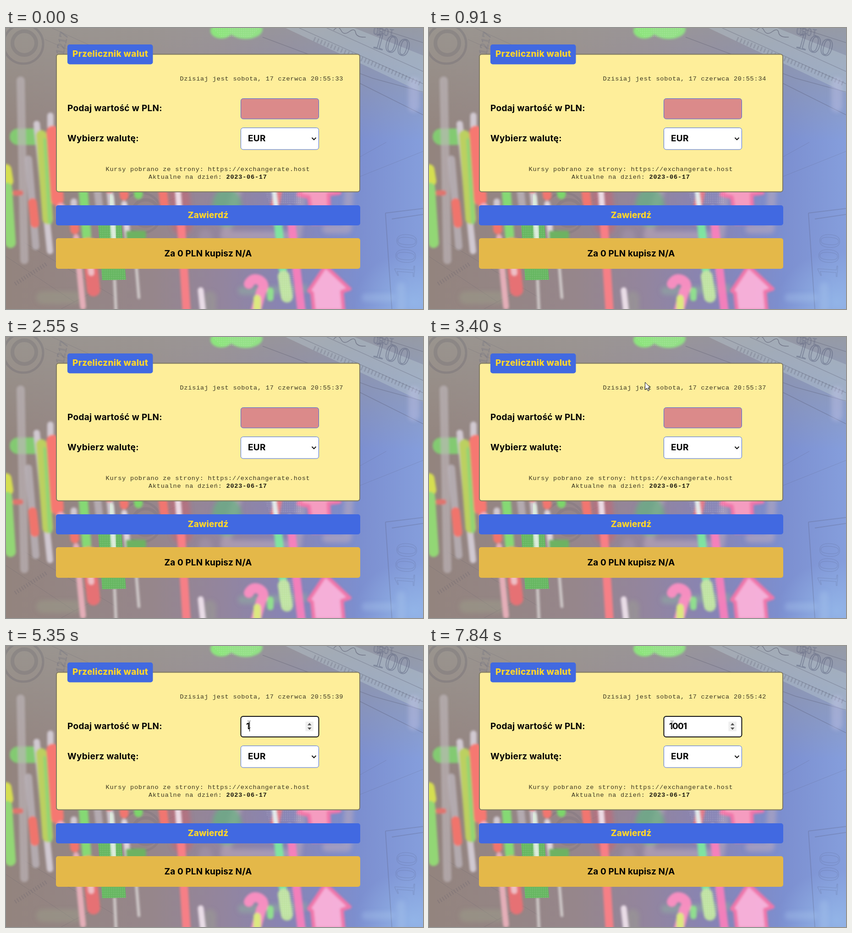
Recreate the animation shown at these times as an HTML page. Size 910x615 px, loop 8000 ms.

```html
<!DOCTYPE html>
<html lang="pl">
<head>
<meta charset="utf-8">
<title>Przelicznik walut</title>
<style>
  html, body { margin: 0; width: 100%; height: 100%; overflow: hidden; background: #9088a0; }
  svg { display: block; width: 100%; height: 100%; }
  text { font: 700 19px Montserrat, Inter, sans-serif; letter-spacing: .3px; white-space: pre; }
  .mid { text-anchor: middle; letter-spacing: .1px; }
  .gold { font-weight: 800; fill: #ffd52b; }
  .title { font-size: 28.8px; letter-spacing: .4px; }
  .mono { font: 400 13.6px "Liberation Mono", monospace; letter-spacing: .762px; fill: #3c3722; }
  .mono tspan { font-weight: 700; fill: #1c1a10; }
  .bill text { font-family: "Liberation Serif", serif; font-weight: 400; letter-spacing: 0; }
  .panel { fill: #feee9a; stroke: #7f7961; stroke-width: 2; }
  .wicks { fill: none; stroke-linecap: round; stroke-linejoin: round; }
  #beam { mix-blend-mode: difference; }
</style>
</head>
<body>
<svg viewBox="0 0 910 615" preserveAspectRatio="none">
  <defs>
    <linearGradient id="sky">
      <stop offset="0" stop-color="#93847e"/>
      <stop offset=".35" stop-color="#96868b"/>
      <stop offset=".52" stop-color="#93859e"/>
      <stop offset=".68" stop-color="#8784b5"/>
      <stop offset=".85" stop-color="#7c8fd0"/>
      <stop offset="1" stop-color="#859edc"/>
    </linearGradient>
    <linearGradient id="haze" x2="0" y2="1">
      <stop offset="0" stop-color="#9c9a94" stop-opacity=".75"/>
      <stop offset=".4" stop-color="#9c9a94" stop-opacity="0"/>
    </linearGradient>
    <radialGradient id="glow">
      <stop offset="0" stop-color="#9cc4f0" stop-opacity=".6"/>
      <stop offset="1" stop-color="#9cc4f0" stop-opacity="0"/>
    </radialGradient>
    <pattern id="dots" width="4" height="4" patternUnits="userSpaceOnUse">
      <circle cx="2" cy="2" r="1.1" fill="#fff" opacity=".2"/>
    </pattern>
    <filter id="soft" x="-5%" y="-5%" width="110%" height="110%"><feGaussianBlur stdDeviation="2.4"/></filter>
    <filter id="mist" x="-10%" y="-10%" width="120%" height="120%"><feGaussianBlur stdDeviation="5"/></filter>
  </defs>

  <rect width="910" height="615" fill="url(#sky)"/>
  <rect width="910" height="615" fill="url(#haze)"/>
  <ellipse cx="890" cy="600" rx="130" ry="110" fill="url(#glow)"/>

  <g class="bill" fill="none" stroke="#4d4d62">
    <path d="M610 0L910 142V60L760 0Z" fill="#b9cbd2" stroke="none" opacity=".4"/>
    <path d="M560 20L800 110L910 140M640 0L910 122M700 0L910 95M770 120L910 190M810 0L910 32" opacity=".28" stroke-width="1.5"/>
    <path d="M672 24L905 122" stroke-width="10" stroke-dasharray="3 5" opacity=".2"/>
    <path d="M715 5q10-12 16 0t18 3 14 2 22 10" opacity=".5" stroke-width="1.5"/>
    <circle cx="38" cy="35" r="43" opacity=".2" stroke-width="5"/>
    <circle cx="40" cy="33" r="26" opacity=".18" stroke-width="8"/>
    <circle cx="295" cy="405" r="44" opacity=".13" stroke-width="5"/>
    <circle cx="305" cy="405" r="29" opacity=".12" stroke-width="7"/>
    <g opacity=".18">
      <path d="M100 0L210 50M85 25L300 120M130 240L330 150M200 225L460 330M345 200L480 300M390 220H510V290H400ZM330 390L460 330M0 500L150 600M40 470L240 590M120 615L205 570M740 300L830 250M760 330L910 270"/>
      <path d="M120 130L260 205M380 240L520 165M20 560L90 515" stroke-width="9" stroke-dasharray="2 4"/>
    </g>
    <path d="M828 405L910 395M828 405L842 615M842 418L910 408" opacity=".2" stroke-width="2"/>
    <g stroke="#555b78" opacity=".42">
      <text transform="translate(798 42) rotate(15)" style="font-size:54px" stroke-width="2">100</text>
      <text transform="translate(848 4) rotate(187)" style="font-size:23px">1080</text>
      <text transform="translate(890 550) rotate(-86)" style="font-size:66px" opacity=".6">100</text>
      <text transform="translate(125 60) rotate(-78)" style="font-size:25px" opacity=".7">1217</text>
      <text transform="translate(258 132) rotate(-62)" style="font-size:18px" opacity=".7">KB</text>
      <text transform="translate(463 134) rotate(-62)" style="font-size:18px" opacity=".7">B</text>
    </g>
  </g>

  <g class="wicks" filter="url(#mist)">
    <path d="M735 240V275" stroke="#66a5ce" stroke-width="64" opacity=".42"/>
    <path d="M890 120V172" stroke="#c5c6e8" stroke-width="24" opacity=".4"/>
    <path d="M376 345L384 430" stroke="#dc5a68" stroke-width="46" opacity=".4"/>
    <path d="M435 455V505" stroke="#a89ab0" stroke-width="28" opacity=".45"/>
    <path d="M510 335L478 455H635L650 325H530M735 325H750L744 440H700" stroke="#c2adbd" stroke-width="20" opacity=".5"/>
    <ellipse cx="482" cy="392" rx="32" ry="44" fill="#62b77e" opacity=".65"/>
    <ellipse cx="517" cy="268" rx="39" ry="42" fill="#5fb58e" opacity=".6"/>
    <path d="M515 575H555M560 575L650 570" stroke="#8fb29f" stroke-width="18" opacity=".5"/>
    <path d="M445 590V615M80 590H150" stroke="#9eab90" stroke-width="28" opacity=".3"/>
    <path d="M785 590H840M862 565V615" stroke="#a9c6ee" stroke-width="18" opacity=".3"/>
  </g>

  <g class="wicks" filter="url(#soft)" opacity=".92">
    <ellipse cx="470" cy="6" rx="24" ry="17" fill="#8cec7c"/>
    <ellipse cx="523" cy="3" rx="37" ry="21" fill="#92e884"/>
    <ellipse cx="505" cy="226" rx="27" ry="23" fill="#f6a276"/>
    <ellipse cx="556" cy="215" rx="32" ry="19" fill="#e8717c"/>
    <ellipse cx="558" cy="130" rx="30" ry="21" fill="#e5737f"/>
    <ellipse cx="500" cy="150" rx="25" ry="22" fill="#df8b78"/>
    <g fill="#ff9fc0" stroke="#fb75a8" stroke-width="8">
      <path d="M660 98L703 136H690V212H638L634 140H615Z" opacity=".85"/>
      <path d="M674 311L728 361L704 364L706 426L669 427L661 370L638 365Z"/>
      <path d="M697 521L750 571L733 577L737 620H672L668 580L661 575Z" fill="#ffb3da"/>
    </g>
    <path d="M560 334H598L580 422" stroke="#eb7581" stroke-width="19"/>
    <path d="M530 560q8-15 23-8q15 9 4 24L545 620" stroke="#ff8fc2" stroke-width="22"/>
    <path d="M548 592V615" stroke="#e3f27b" stroke-width="16"/>
    <path d="M577 575V591" stroke="#91e58d" stroke-width="14"/>
    <path d="M26 238H62" stroke="#82d171" stroke-width="36"/>
    <path d="M0 310L4 335" stroke="#dce64e" stroke-width="24"/>
    <path d="M2 350L10 470" stroke="#93df75" stroke-width="23"/>
    <path d="M32 115L40 508" stroke="#c3bcc1" stroke-width="18" opacity=".65"/>
    <path d="M49 287L65 478M181 190L204 395" stroke="#c2bcc5" stroke-width="16" opacity=".75"/>
    <path d="M67 210L96 488M97 192V215M162 272L166 315M217 254L240 501M148 380V408" stroke="#d6cfd8" stroke-width="14"/>
    <path d="M77 235L91 418" stroke="#c0d75d" stroke-width="23"/>
    <path d="M86 245L96 425" stroke="#92dc72" stroke-width="9"/>
    <path d="M102 228L112 375" stroke="#ff776f" stroke-width="28"/>
    <path d="M120 392V414" stroke="#f7b3c6" stroke-width="18"/>
    <path d="M58 382L63 428M148 416L150 442M222 313L225 352" stroke="#f9736b" stroke-width="19"/>
    <path d="M20 361H32" stroke="#e6736d" stroke-width="12"/>
    <path d="M166 322L176 455" stroke="#84e173" stroke-width="20"/>
    <path d="M186 295H198" stroke="#7dd86b" stroke-width="15"/>
    <path d="M153 458L168 610" stroke="#ecb2bd" stroke-width="13"/>
    <path d="M180 473L191 573" stroke="#ee7073" stroke-width="29"/>
    <path d="M180 473L186 536" stroke="#f7c5cc" stroke-width="13"/>
    <path d="M169 464H190" stroke="#e8d66a" stroke-width="6"/>
    <path d="M250 290L258 368M326 212L346 392" stroke="#fa756d" stroke-width="19"/>
    <path d="M258 385L267 470" stroke="#e7dde3" stroke-width="13"/>
    <path d="M265 447H302V496H267Z" fill="#6bb75f" stroke="#6bb75f" stroke-width="7"/>
    <path d="M270 185L283 277" stroke="#e6e5ed" stroke-width="15"/>
    <path d="M284 287L289 365M302 190L317 320" stroke="#7ade68" stroke-width="19"/>
    <path d="M315 290L317 321M349 407V409" stroke="#e8fae3" stroke-width="10"/>
    <path d="M381 412L394 620" stroke="#ff7f85" stroke-width="18"/>
    <path d="M375 354L379 410M425 574L430 620" stroke="#f1e4ee" stroke-width="13"/>
    <path d="M592 410L604 528" stroke="#7ceb9f" stroke-width="18"/>
    <path d="M584 350L591 404" stroke="#ebf5f2" stroke-width="10"/>
    <path d="M606 544L613 588" stroke="#c5eba1" stroke-width="26"/>
    <path d="M621 407L633 520L645 620" stroke="#fc7fbc" stroke-width="18"/>
    <path d="M619 394L621 402" stroke="#f7eaf4" stroke-width="10"/>
    <path d="M283 505L290 590M237 552L240 620" stroke="#d9d5d4" stroke-width="6"/>
  </g>
  <path d="M200 416L251 418L262 551L210 552Z" fill="#64b65f"/>
  <path d="M228 370L239 500" stroke="#dcebdc" stroke-width="13" stroke-linecap="round" filter="url(#soft)"/>
  <path d="M200 416L251 418L262 551L210 552ZM450 0H555L535 20H470ZM528 200H585V232H528ZM535 112H585V140H535ZM550 318H645V385H575ZM595 530H628V590H600Z" fill="url(#dots)"/>

  <g id="form">
    <rect class="panel" x="110" y="57.500" width="662" height="301" rx="5"/>
    <rect x="134" y="36" width="186.500" height="43.500" rx="5" fill="#4169e1"/>
    <text class="gold" x="145" y="63">Przelicznik walut</text>
    <text class="mono" id="clock" x="379.500" y="115"></text>
    <text x="134" y="182">Podaj wartość w PLN:</text>
    <text x="134" y="248">Wybierz walutę:</text>
    <rect id="field" x="512.500" y="154.500" width="170" height="44.500" rx="5" stroke="#4169e1"/>
    <rect id="ring" x="512.500" y="154" width="170" height="45" rx="5" fill="none" stroke="#101010" stroke-width="2"/>
    <text id="value" y="182"></text>
    <g id="spin">
      <rect x="653.500" y="165.500" width="17.500" height="21" fill="#efefef"/>
      <path d="M658 173.500L662.300 168.500L666.600 173.500ZM658 178.500L662.300 183.500L666.600 178.500Z" fill="#505050"/>
    </g>
    <rect x="512.500" y="218.500" width="170" height="47.500" rx="5" fill="#fff" stroke="#4169e1"/>
    <text x="528" y="248">EUR</text>
    <path d="M667.500 240L672 244.500L676.500 240" fill="none" stroke="#111" stroke-width="2"/>
    <text class="mono" x="217.500" y="313">Kursy pobrano ze strony: https://exchangerate.host</text>
    <text class="mono" x="311" y="330">Aktualne na dzień: <tspan>2023-06-17</tspan></text>
    <rect id="button" x="109" y="388" width="664" height="44" rx="5"/>
    <text class="gold mid" x="441" y="416">Zawierdź</text>
  </g>

  <g id="loading">
    <rect class="panel" x="110" y="30.500" width="662" height="79" rx="5"/>
    <text class="mid title" x="441" y="79">Ładuję tebelę kursów</text>
  </g>

  <g id="result">
    <rect x="109" y="460" width="664" height="67" rx="5" fill="#e4b849"/>
    <text class="mid" x="441" y="500">Za 0 PLN kupisz N/A</text>
  </g>

  <path id="arrow" d="M0 0V16.500L4 13L6.500 19L9 18L6.500 12H11.500Z" fill="#fff" stroke="#111"/>
  <rect id="caret" y="166" width="1.200" height="21" fill="#111"/>
  <path id="beam" d="M-3.500-7.500H-1L0-6.500L1-7.500H3.500M0-6.500V6.500M-3.500 7.500H-1L0 6.500L1 7.500H3.500" fill="none" stroke="#b0b0b0"/>
</svg>

<script>
const LOOP = 8000;
const $ = id => document.getElementById(id);
const set = (id, attrs) => { for (const k in attrs) $(id).setAttribute(k, attrs[k]); };
const show = (id, on) => set(id, { display: on ? 'inline' : 'none' });
const within = (t, spans) => spans.some(([a, b]) => t >= a && t < b);
const passed = (t, times) => times.filter(k => t >= k).length;
const mix = (a, b, p) => a + (b - a) * p;

// Moments at which the clock ticks, from second 33; loading skips two of them.
const ticks = [910, 2550, 2550, 2550, 3450, 4480, 5480, 6480, 7520];
const keys = [5350, 6190, 6400, 7260];
const stops = [524, 531, 543, 555, 562];
const caretOn = [[3900, 4400], [4980, 5910], [6190, 6910], [7260, 7840]];

function pointer(t) {
  if (t >= 170 && t < 610) {
    if (t >= 540) return [29, 199];
    const p = t < 245 ? 0 : t < 320 ? .3 : 1;
    return [mix(505, 43, p), mix(479, 205, p)];
  }
  if (t < 3040) return null;
  if (t >= 4050) return [530.5, 171.5];
  const p = Math.min(1, Math.floor((t - 3040) / 71) / 10);
  const e = p * p * (3 - 2 * p);
  return [mix(405, 538, e), mix(22, 176, e)];
}

function draw(t) {
  const loading = t >= 1770 && t < 2550;
  const typed = passed(t, keys);

  show('form', !loading);
  show('loading', loading);
  set('result', { transform: `translate(0 ${loading ? -321 : 0})` });
  $('clock').textContent = 'Dzisiaj jest sobota, 17 czerwca 20:55:' + (33 + passed(t, ticks));

  set('button', { fill: t >= 245 && t < 320 ? '#557be6' : '#4169e1' });
  set('field', { fill: typed ? '#fff' : '#db8a8a' });
  show('ring', t >= 3900);
  $('value').textContent = '1001'.slice(0, typed);
  set('value', { x: stops.slice(0, typed || 1).join(' ') });

  const at = pointer(t);
  const text = at && at[0] > 512 && at[1] > 154 && at[1] < 199;
  show('spin', text);
  show('arrow', at && !text);
  show('beam', text);
  if (at) set(text ? 'beam' : 'arrow', { transform: `translate(${at})` });

  show('caret', within(t, caretOn));
  set('caret', { x: stops[typed] });
}

const start = performance.now();
function tick() {
  draw((performance.now() - start) % LOOP);
  requestAnimationFrame(tick);
}
tick();
</script>
</body>
</html>
```
